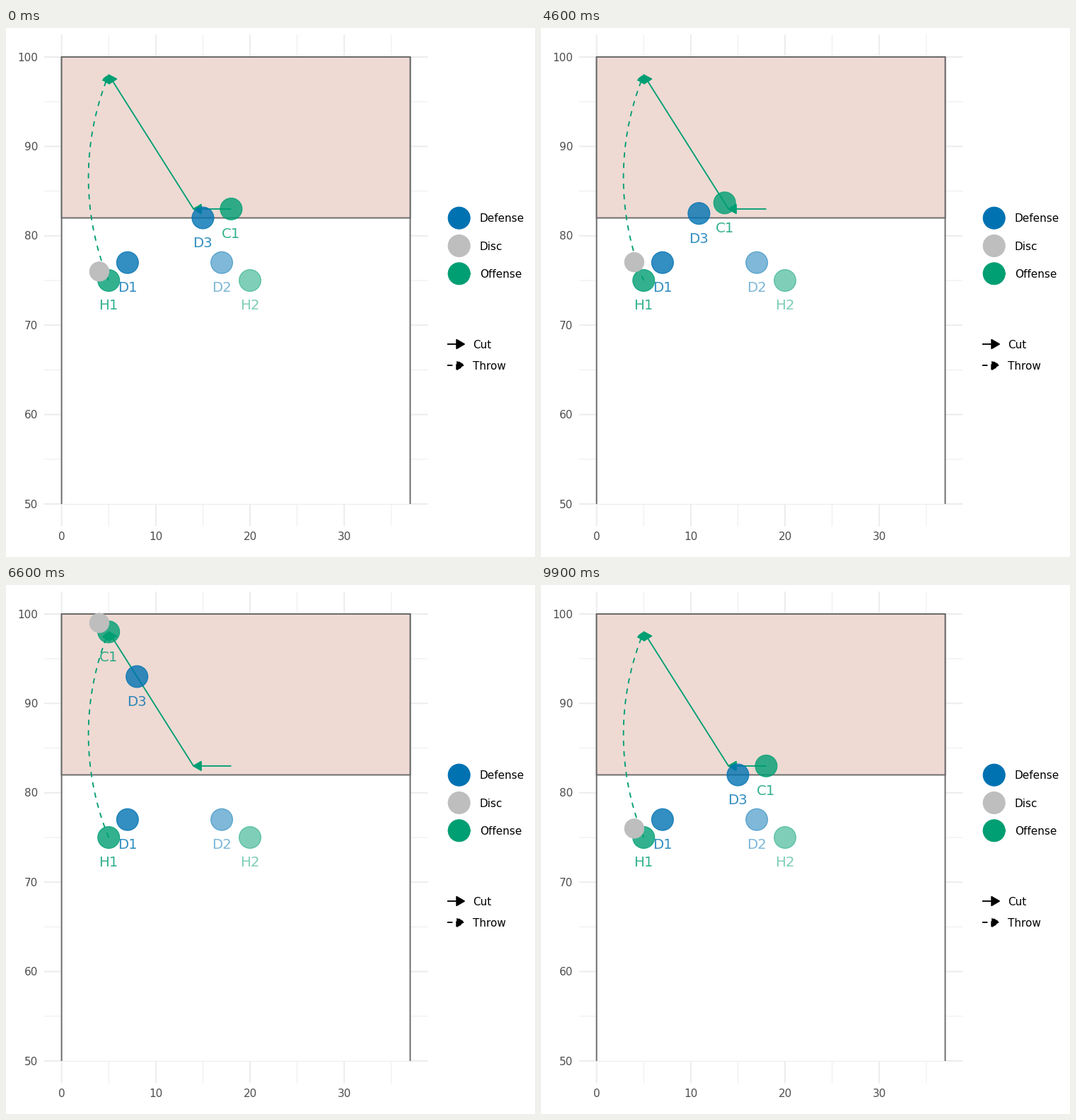
A matplotlib script that plays this animation: 748x748 px, repeating every 10000 ms.

```python
import numpy as np
import matplotlib.pyplot as plt
from matplotlib.animation import FuncAnimation
from matplotlib.patches import Circle, Polygon, Rectangle

SIZE = 748
PT = 0.72                      # points per pixel at 100 dpi
BLUE, GREEN, DISC = "#0072B2", "#009E73", "#BEBEBE"
BORDER, GRID, ZONE = "#666666", "#EBEBEB", "#EEDAD3"
LINE, THIN = 1.85, 0.93        # stroke widths in pixels
LABEL, SMALL = 19.76, 15.28    # font sizes in pixels
HEAD = 12.5
DASH = (0, (4, 4))
LEFT, RIGHT, TOP, BOTTOM = 54.0, 596.3, 9.4, 704.6

plt.rcParams["font.family"] = "DejaVu Sans"
fig = plt.figure(figsize=(SIZE / 100, SIZE / 100), dpi=100, facecolor="white")
ax = fig.add_axes([0, 0, 1, 1])
ax.set_xlim(0, SIZE)
ax.set_ylim(SIZE, 0)
ax.axis("off")


def px(x, y):
    """Field yards to stage pixels."""
    return 78.6 + 13.322 * x, 41.0 + 12.64 * (100 - y)


def line(xs, ys, color, width=LINE, style="-", z=3):
    ax.plot(xs, ys, color=color, lw=width * PT, ls=style, zorder=z, snap=False,
            solid_capstyle="butt", dash_capstyle="butt",
            solid_joinstyle="round", dash_joinstyle="round")


def arrow(xs, ys, color, style="-", z=3):
    """Polyline with a filled triangular head on its last point."""
    line(xs, ys, color, style=style, z=z)
    back = np.arctan2(ys[-2] - ys[-1], xs[-2] - xs[-1])
    tip = np.array([xs[-1], ys[-1]])
    a, b = (tip + HEAD * np.array([np.cos(t), np.sin(t)])
            for t in (back - np.pi / 6, back + np.pi / 6))
    ax.add_patch(Polygon([a, tip, b], fc=color, ec=color, lw=LINE * PT, ls=style,
                         joinstyle="round", capstyle="butt", snap=False, zorder=z))


def dot(x, y, color, alpha=1.0, r=15.43, z=5):
    rgba = plt.matplotlib.colors.to_rgba(color, alpha)
    patch = Circle((x, y), r, fc=rgba, ec=rgba, lw=1.23 * PT, snap=False, zorder=z)
    return ax.add_patch(patch)


def text(x, y, s, size, color, ha="left", alpha=1.0):
    return ax.text(x, y, s, fontsize=size * PT, color=color, alpha=alpha,
                   ha=ha, va="baseline", zorder=4)


class Player:
    def __init__(self, name, color, alpha, spots):
        self.spots = np.array(spots, float)
        self.dot = dot(0, 0, color, alpha)
        self.label = text(0, 0, name, LABEL, color, "center", alpha)

    def place(self, a, b, p):
        x, y = px(*(self.spots[a] + (self.spots[b] - self.spots[a]) * p))
        self.dot.center = x, y
        self.label.set_position((x, y + 41.3))


class Disc(Player):
    def __init__(self, spots):
        self.spots = np.array(spots, float)
        self.dot = dot(0, 0, DISC, r=13.58, z=6)

    def place(self, a, b, p):
        self.dot.center = px(*(self.spots[a] + (self.spots[b] - self.spots[a]) * p))


def draw_grid():
    for i, v in enumerate(range(0, 40, 5)):
        x = px(v, 0)[0]
        line([x, x], [TOP, BOTTOM], GRID, THIN if i % 2 else LINE, z=1)
        if i % 2 == 0:
            text(x, 724.3, str(v), SMALL, "#4D4D4D", "center")
    for i, v in enumerate(range(50, 101, 5)):
        y = px(0, v)[1]
        line([LEFT, RIGHT], [y, y], GRID, THIN if i % 2 else LINE, z=1)
        if i % 2 == 0:
            text(45.4, y + 5.6, str(v), SMALL, "#4D4D4D", "right")


def draw_field():
    (x0, y0), (x1, y1), (_, goal) = px(0, 100), px(37, 50), px(0, 82)
    ax.add_patch(Rectangle((x0, y0), x1 - x0, y1 - y0, fc="white", ec="none",
                           snap=False, zorder=2))
    line([x0, x0, x1, x1], [y1, y0, y0, y1], BORDER, z=2.1)
    ax.add_patch(Rectangle((x0, y0), x1 - x0, goal - y0, fc=ZONE, ec=BORDER,
                           lw=LINE * PT, snap=False, zorder=2.2))


def draw_routes():
    path = [px(18, 83), px(14, 83), px(5, 98)]
    for (xa, ya), (xb, yb) in zip(path, path[1:]):
        arrow([xa, xb], [ya, yb], GREEN)
    # The throw is a circular arc bulging to the left.
    (x, ya), (_, yb) = px(5, 75), px(5, 98)
    half = 2 * np.arctan(2 * 0.0985)
    radius = (ya - yb) / (2 * np.sin(half))
    t = np.linspace(-half, half, 60)
    arrow(x + radius * (np.cos(half) - np.cos(t)),
          (ya + yb) / 2 - radius * np.sin(t), GREEN, DASH)


def draw_legend():
    arrow([624.9, 656.5], [347.3, 347.3], GREEN)
    for i, (name, color) in enumerate(
            [("Defense", BLUE), ("Disc", DISC), ("Offense", GREEN)]):
        y = 268.7 + 39.3 * i
        dot(640.7, y, color)
        text(669.8, y + 5.6, name, SMALL, "black")
    for name, y, style in (("Cut", 447, "-"), ("Throw", 477, DASH)):
        arrow([624, 648], [y, y], "black", style)
        text(660.3, y + 5.6, name, SMALL, "black")


draw_grid()
draw_field()
draw_routes()
draw_legend()

pieces = [
    Player("H1", GREEN, 0.8, [(5, 75)] * 3),
    Player("H2", GREEN, 0.5, [(20, 75)] * 3),
    Player("C1", GREEN, 0.8, [(18, 83), (14, 83), (5, 98)]),
    Player("D1", BLUE, 0.8, [(7, 77)] * 3),
    Player("D2", BLUE, 0.5, [(17, 77)] * 3),
    Player("D3", BLUE, 0.8, [(15, 82), (11, 82), (8, 93)]),
    Disc([(4, 76), (4, 76), (4, 99)]),
]

# (from, to, first step, steps) on a 101-step timeline
MOVES = [(0, 1, 11, 22), (1, 2, 45, 22), (2, 0, 79, 21)]


def update(i):
    step = i + (i >= 50)       # 101 steps sampled into 100 frames
    a, b, start, count = [m for m in MOVES if m[2] <= max(step, 11)][-1]
    p = min(max((step - start) / count, 0), 1)
    for piece in pieces:
        piece.place(a, b, p)
    return []


anim = FuncAnimation(fig, update, frames=100, interval=100, repeat=True,
                     repeat_delay=0, init_func=lambda: update(0), blit=False)
plt.show()
```
